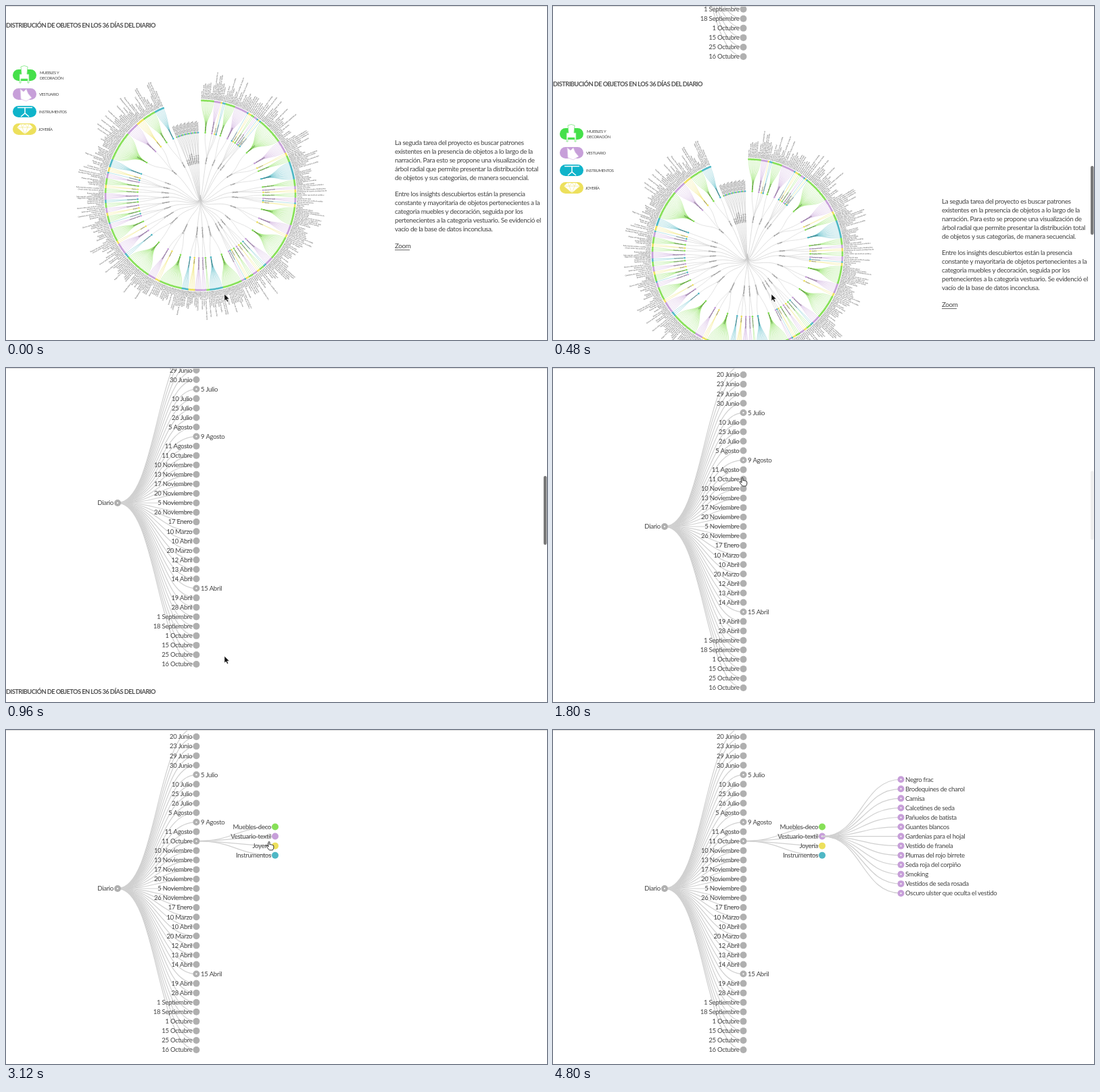
Animation of 800x495 px, one loop 5280 ms. Source, as an HTML page with a canvas:

```html
<!DOCTYPE html>
<html lang="es">
<head>
<meta charset="utf-8">
<style>
  html, body { margin: 0; width: 100%; height: 100%; overflow: hidden; background: #fff; }
  canvas { display: block; width: 800px; height: 495px; }
</style>
</head>
<body>
<canvas id="stage" width="800" height="495"></canvas>
<script>
const ctx = document.getElementById('stage').getContext('2d');
const LOOP = 5280, STEP = 120, LAST = 4800, SCROLL = 486;
const COLORS = { g: '#86e057', p: '#c79fd9', y: '#ede05c', t: '#4fb7c5' };
const INK = '#444', GREY = '#b0b0b0';

const DAYS = ('17 Junio,20 Junio,23 Junio,29 Junio,30 Junio,5 Julio,10 Julio,25 Julio,26 Julio,5 Agosto,' +
  '9 Agosto,11 Agosto,11 Octubre,10 Noviembre,13 Noviembre,17 Noviembre,20 Noviembre,5 Noviembre,' +
  '26 Noviembre,17 Enero,10 Marzo,10 Abril,20 Marzo,12 Abril,13 Abril,14 Abril,15 Abril,19 Abril,' +
  '28 Abril,1 Septiembre,18 Septiembre,1 Octubre,15 Octubre,25 Octubre,16 Octubre').split(',');
const CHILDLESS = ['5 Julio', '9 Agosto', '15 Abril'];
const CATEGORIES = [['Muebles-deco', 'g'], ['Vestuario-textil', 'p'], ['Joyería', 'y'], ['Instrumentos', 't']];
const CLOTHES = ['Negro frac', 'Brodequines de charol', 'Camisa', 'Calcetines de seda', 'Pañuelos de batista',
  'Guantes blancos', 'Gardenias para el hojal', 'Vestido de franela', 'Plumas del rojo birrete',
  'Seda roja del corpiño', 'Smoking', 'Vestidos de seda rosada', 'Oscuro ulster que oculta el vestido'];
const PARAGRAPHS = [
  [203, 'La seguda tarea del proyecto es buscar patrones', 'existentes en la presencia de objetos a lo largo de la',
    'narración. Para esto se propone una visualización de', 'árbol radial que permite presentar la distribución total',
    'de objetos y sus categorías, de manera secuencial.'],
  [278.5, 'Entre los insights descubiertos están la presencia', 'constante y mayoritaria de objetos pertenecientes a la',
    'categoria muebles y decoración, seguida por los', 'pertenecientes a la categoria vestuario. Se evidenció el',
    'vacío de la base de datos inconclusa.']];

const clamp = v => Math.max(0, Math.min(1, v));
const cubicInOut = v => v < .5 ? 4 * v ** 3 : 1 - 4 * (1 - v) ** 3;
const grow = (t, start) => cubicInOut(clamp((t - start) / 680));

function text(str, x, y, size, { align = 'left', color = INK, spacing = -.3, weight = '' } = {}) {
  ctx.font = `${weight} ${size}px Lato, sans-serif`;
  ctx.letterSpacing = spacing + 'px';
  ctx.textAlign = align;
  ctx.fillStyle = color;
  ctx.fillText(str, x, y + size * .35);
}

function disk(x, y, r, color) {
  ctx.fillStyle = color;
  ctx.beginPath();
  ctx.arc(x, y, r, 0, 7);
  ctx.fill();
}

function curve(x0, y0, x1, y1, x2, y2, x3, y3, color, width) {
  ctx.strokeStyle = color;
  ctx.lineWidth = width;
  ctx.beginPath();
  ctx.moveTo(x0, y0);
  ctx.bezierCurveTo(x1, y1, x2, y2, x3, y3);
  ctx.stroke();
}

// Radial tree: colour letter plus degrees per category, days split by spaces; 0 means no leaves
const LAYOUT = 'g8p4y1t2 g6p8 t1y2g2p2t1 y1t1 g16p8y2 g4t11 g4p2y2 g3p3t1y2 g11p6y2 g15p5 t2g3y2 p3g3 ' +
  'y2t1p2 g12t8 g2p3 p4y4t4 g14y3p5 g16t3 p7y2 g8p3t1 g4y2p3 g3t2p4 g3y2 g4p3t1y3 t5 g18p8y5 g8t6' +
  ' g0p0t0'.repeat(7);
let seed = 7;
const random = () => (seed = seed * 16807 % 2147483647) / 2147483647;
const pick = list => list[Math.floor(random() * list.length)];
function leafLabel() {
  const label = pick(CLOTHES);
  return random() < .2 ? (label + ' y ' + pick(CLOTHES).toLowerCase()).slice(0, 38) : label;
}

const RAD = Math.PI / 180;
const radialDays = [];
let degree = .4;
for (const spec of LAYOUT.split(' ')) {
  const categories = spec.match(/[a-z]\d+/g).map(token => {
    const span = +token.slice(1), from = degree;
    degree += span || 1;
    const count = Math.round(span * 1.15);
    const leaves = Array.from({ length: count }, (_, i) => ({
      angle: (from + (i + .5) * span / count) * RAD,
      label: leafLabel()
    }));
    return { key: token[0], angle: (from + (span || 1) / 2) * RAD, leaves };
  });
  radialDays.push({ angle: (categories[0].angle + categories.at(-1).angle) / 2, categories });
}

const CX = 287.5, CY = 280.5;
const polar = (r, a) => [CX + r * Math.sin(a), CY - r * Math.cos(a)];
function radialLink(r0, a0, r1, a1, color, width) {
  const mid = (r0 + r1) / 2;
  curve(...polar(r0, a0), ...polar(mid, a0), ...polar(mid, a1), ...polar(r1, a1), color, width);
}
function radialText(str, r, angle, size) {
  const left = angle > Math.PI;
  ctx.save();
  ctx.translate(...polar(r, angle));
  ctx.rotate(angle + (left ? Math.PI : -Math.PI) / 2);
  text(str, 0, 0, size, { align: left ? 'right' : 'left', color: '#333', spacing: 0 });
  ctx.restore();
}

function radialTree() {
  radialDays.forEach((day, i) => {
    radialLink(0, Math.PI, 46, day.angle, '#c8c8c8', .6);
    for (const cat of day.categories) {
      radialLink(46, day.angle, 93, cat.angle, '#d0d0d0', .6);
      ctx.globalAlpha = .65;
      for (const leaf of cat.leaves) radialLink(93, cat.angle, 140.5, leaf.angle, COLORS[cat.key], .6);
      ctx.globalAlpha = 1;
    }
    radialText(DAYS[i], 47, day.angle, 2.6);
  });
  for (const { categories } of radialDays) for (const cat of categories) {
    disk(...polar(93, cat.angle), 1.3, COLORS[cat.key]);
    radialText(CATEGORIES.find(c => c[1] === cat.key)[0], 95, cat.angle, 2.3);
    for (const leaf of cat.leaves) {
      disk(...polar(140.5, leaf.angle), 1.5, COLORS[cat.key]);
      radialText(leaf.label, 143, leaf.angle, 2.5);
    }
  }
}

function icon(path, fill, stroke, width) {
  const shape = new Path2D(path);
  ctx.fillStyle = fill;
  ctx.fill(shape);
  ctx.strokeStyle = stroke;
  ctx.lineWidth = width;
  ctx.stroke(shape);
}

function legend() {
  const pills = [[102.5, '#45e04a'], [130.5, '#c79fd9'], [156.5, '#0fb4ca'], [182.5, '#ede05c']];
  for (const [y, color] of pills) {
    ctx.fillStyle = color;
    ctx.beginPath();
    ctx.roundRect(10, y - 8.5, 35, 17, 8.5);
    ctx.fill();
  }
  icon('M22 90q5-3 10 0l-1 11h3v13h-2v-6h-10v6h-2v-13h3z', '#fff', '#7de87f', .8);
  icon('M21 123l5 4 4-4 3 7 5 6-8 5-8-3z', '#fff', '#dcc3e7', .8);
  icon('M17 150.5h22M28 151v9M22 164l6-5 6 5', 'transparent', '#fff', 1.5);
  icon('M16 180l5-5h14l5 5-12 10z', '#fff', '#f0e678', .6);
  icon('M16 180h24M22 175l2 5 4 10 4-10 2-5M24 180l4-5 4 5', 'transparent', '#f0e678', .6);
  const style = { spacing: -.4 };
  text('MUEBLES Y', 50, 99, 5.9, style);
  text('DECORACIÓN', 50, 106.5, 5.9, style);
  text('VESTUARIO', 49, 131, 5.9, style);
  text('INSTRUMENTOS', 49, 156.5, 5.9, style);
  text('JOYERÍA', 48, 183, 5.9, style);
}

function article() {
  text('DISTRIBUCIÓN DE OBJETOS EN LOS 36 DÍAS DEL DIARIO', 0, 28.5, 9.3, { weight: 'bold', spacing: -.57, color: '#505050' });
  legend();
  radialTree();
  for (const [y, ...lines] of PARAGRAPHS)
    lines.forEach((line, i) => text(line, 575, y + i * 13, 9.9, { spacing: -.36 }));
  text('Zoom', 575, 356, 9.9, { spacing: -.36 });
  ctx.fillRect(575, 361, 22, .8);
}

function link(x0, y0, x1, y1) {
  const mid = (x0 + x1) / 2;
  curve(x0, y0, mid, y0, mid, y1, x1, y1, '#d0d0d0', 1.2);
}
function node(x, y, color, open, label, left, scale = 1) {
  disk(x, y, 5 * scale, color);
  if (open) disk(x, y, 1.2 * scale, '#f4f4f4');
  ctx.globalAlpha = scale;
  text(label, x + (left ? -6 : 6.5), y, 9.6, { align: left ? 'right' : 'left' });
  ctx.globalAlpha = 1;
}
function branch(x, y, items, progress, draw) {
  if (progress < .001) return;
  const spots = items.map((item, i) =>
    [x + 116.5 * progress, y + (i - (items.length - 1) / 2) * 14.06 * progress, item]);
  for (const [nx, ny] of spots) link(x, y, nx, ny);
  for (const spot of spots) draw(...spot);
}

// Drawn in final scroll position
function diaryTree(t) {
  const first = grow(t, 2130), second = grow(t, 3608);
  branch(281.5, 164.6, CATEGORIES, first, (x, y, [name, key]) =>
    node(x, y, COLORS[key], key === 'p' && second > 0, name, true, first));
  branch(398, 157.6, CLOTHES, second, (x, y, name) => node(x, y, COLORS.p, true, name, false, second));
  branch(165, 235, DAYS, 1, (x, y, name) => {
    const childless = CHILDLESS.includes(name);
    node(x, y, GREY, childless || (name === '11 Octubre' && first > 0), name, !childless);
  });
  node(165, 235, GREY, true, 'Diario', true);
}

const CURSOR = [[0, 323, 427], [1500, 323, 427], [1560, 317, 390], [1680, 296, 260], [1800, 280, 163], [2760, 280, 163],
  [2880, 312, 165], [3000, 362, 167], [3120, 389, 166], [3360, 389, 167], [3480, 396, 160], [4200, 396, 160],
  [4320, 300, 265], [4440, 85, 480]];
function cursor(t) {
  const i = CURSOR.findIndex(k => k[0] >= t);
  if (i < 0) return;
  const [t1, x1, y1] = CURSOR[i], [t0, x0, y0] = CURSOR[Math.max(0, i - 1)];
  const f = t1 > t0 ? (t - t0) / (t1 - t0) : 0;
  const hand = (t >= 1800 && t <= 2760) || (t >= 3120 && t <= 4200);
  ctx.save();
  ctx.translate(x0 + (x1 - x0) * f, y0 + (y1 - y0) * f);
  if (hand) icon('M-1 0q1.2-1 2 0v4l1-.6 1 .8 1.2-.4.8 1 1.2 0 .6 1.2v3l-1.4 3H.4L-3 8l-1-2.5 1.2-.5L-1 7z', '#fff', '#222', .9);
  else icon('M0 0v10l2.3-2 1.8 3.6 1.6-.8L4 7.3h3.2z', '#111', '#fff', .5);
  ctx.restore();
}

function scrollOffset(t) {
  return t < 360 ? 0 : Math.round(SCROLL / (1 + Math.exp(-.0085 * (t - 659))));
}

function draw(t) {
  const offset = scrollOffset(t);
  ctx.fillStyle = '#fff';
  ctx.fillRect(0, 0, 800, 495);
  ctx.save();
  ctx.translate(0, offset);
  if (offset < 480) article();
  ctx.translate(0, -SCROLL);
  diaryTree(t);
  ctx.restore();

  ctx.fillStyle = '#dcdcdc';
  ctx.fillRect(0, 0, 800, 1);
  const alpha = t < 360 ? 0 : t <= 1560 ? 1 : t <= 1680 ? .5 : t <= 1800 ? .12 : 0;
  ctx.fillStyle = `rgba(120,120,120,${alpha})`;
  ctx.beginPath();
  ctx.roundRect(795, 255.4 - .2115 * offset, 4.5, 102, 2.2);
  ctx.fill();
  cursor(t);
}

let shown = -1;
function tick(now) {
  const t = Math.min(LAST, Math.floor(now % LOOP / STEP) * STEP);
  if (t !== shown) draw(shown = t);
  requestAnimationFrame(tick);
}
requestAnimationFrame(tick);
</script>
</body>
</html>
```
